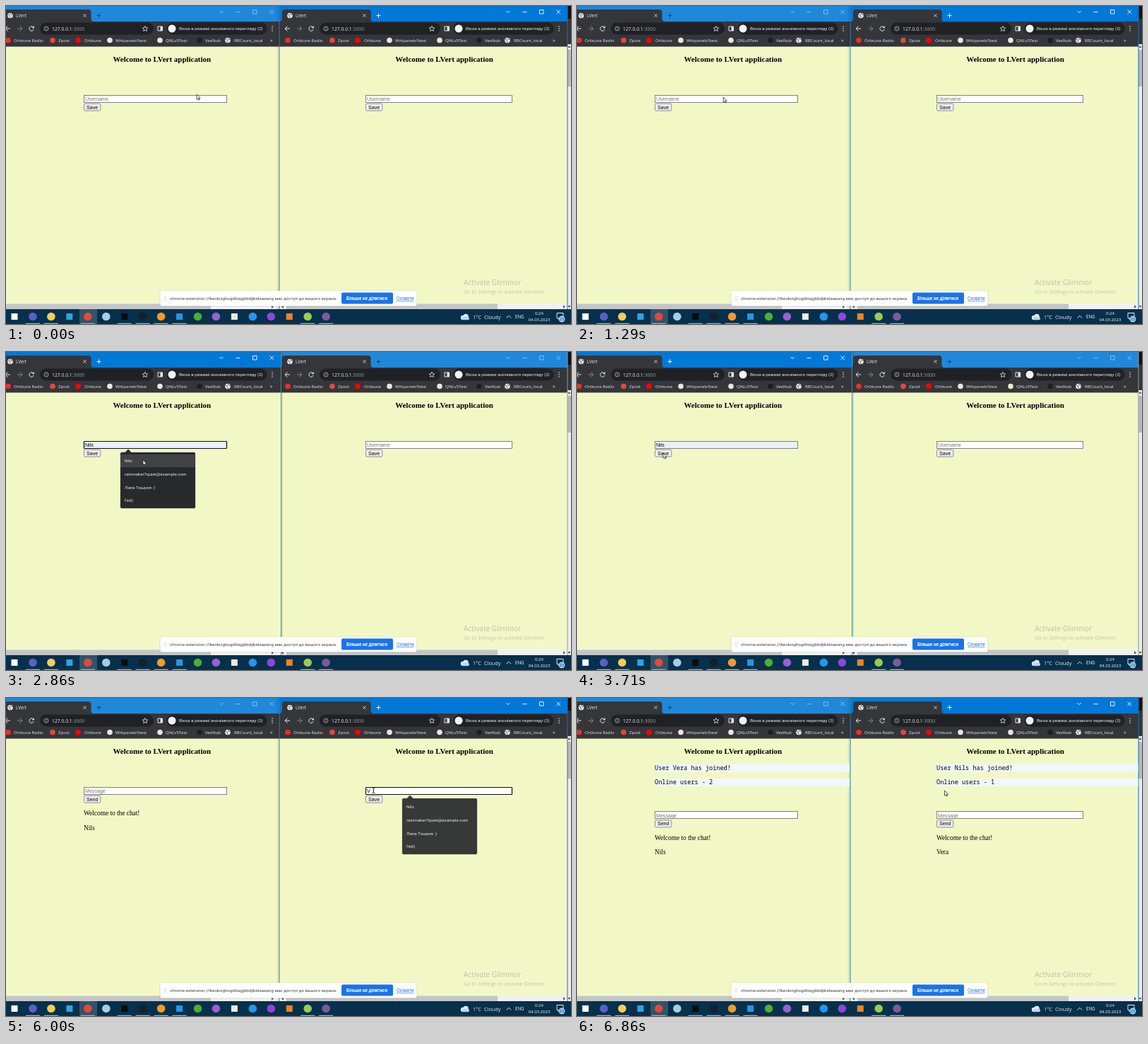
Animation of 800x450 px, one loop 8 s. Source, as an HTML page:

```html
<!DOCTYPE html>
<html lang="uk">
<head>
<meta charset="utf-8">
<title>Chat demo</title>
<style>
  html, body { margin: 0; width: 100%; height: 100%; overflow: hidden; background: #f1f8c6; }
  svg { display: block; width: 800px; height: 450px; font-family: "Open Sans", "Noto Sans", sans-serif; }
  .ui { font-family: Roboto, "Open Sans", sans-serif; }
  .form { font-family: "Liberation Sans", Arial, sans-serif; }
  .serif { font-family: "Liberation Serif", "Times New Roman", serif; }
  .mono { font-family: "Noto Sans Mono", "DejaVu Sans Mono", monospace; }
</style>
</head>
<body>
<svg id="stage" viewBox="0 0 800 450"></svg>
<script>
const LOOP = 8000, TICKS_PER_MS = 7 / 1000;
const APP = 'LVert', FIRST = 'Nils', SECOND = 'Vera';
const SUGGESTIONS = [FIRST, 'rainmaker7quiet@example.com', 'Лапа Тошуня :)', 'Гей)'];
const PAGE = '#f1f8c6', TOOLBAR = '#35363a', PALE = '#e8eaed';

const rect = (x, y, w, h, fill, extra = '') =>
  `<rect x="${x}" y="${y}" width="${w}" height="${h}" fill="${fill}" ${extra}/>`;
const disc = (x, y, r, fill) => `<circle cx="${x}" cy="${y}" r="${r}" fill="${fill}"/>`;
const line = (d, stroke = PALE, width = 1, extra = '') =>
  `<path d="${d}" fill="none" stroke="${stroke}" stroke-width="${width}" ${extra}/>`;
const text = (x, y, size, str, fill = PALE, extra = '') =>
  `<text x="${x}" y="${y}" font-size="${size}" fill="${fill}" ${extra}>${str}</text>`;
const shift = (dx, body, extra = '') => `<g transform="translate(${dx} 0)" ${extra}>${body}</g>`;
const MIDDLE = 'text-anchor="middle"';

const globe = (x, y) => disc(x, y, 3.8, '#eceef0') +
  line(`M${x - 3} ${y - 1.5}l2.5 1l-.5 2l2 1.5M${x + .5} ${y - 3.5}l.5 2l2.3 .5`, '#55585d', .9);

// Bookmarks: icon x, text x, label, icon colour (none means a globe)
const BOOKMARKS = [
  [3, 11, 'Orbtune Radio', '#e8302a'], [66, 74, 'Zpost', '#e04a3c'],
  [102, 111, 'Orbtune', '#f00'], [147, 155, 'Wrkpanelv5test', '#f2e3d8'],
  [218, 226, 'QNLv5Test', '#f2e3d8'], [274, 282, 'VexNub', '#1d1f22'],
  [314, 323, 'RBCount_local']
];

// dx moves parts anchored left, rx parts anchored right
function browser(x0, x1, dx, rx, active) {
  const white = active ? '#fff' : '#8fc3ec';
  const left =
    `<path d="M-9 22Q-5 22 -5 18V9Q-5 5 -1 5H116.5Q120.5 5 120.5 9V18Q120.5 22 124.5 22Z" fill="${TOOLBAR}"/>` +
    globe(6, 13.5) + text(14, 16, 6.3, APP) +
    line('M109.5 11.5l4 4m0 -4l-4 4', PALE, .9) +
    line('M128.5 13.5h6m-3 -3v6', active ? '#fff' : '#123f66', 1) +
    line('M6 32H-1M2.5 28.5L-1 32L2.5 35.5') +
    line('M16 32h7M19.5 28.5L23 32L19.5 35.5', '#85878a') +
    line('M38.6 30A3.2 3.2 0 1 0 39.2 33') + `<path d="M39.8 28v3.2h-3.2z" fill="${PALE}"/>` +
    rect(48, 23.5, 161 + rx - dx, 17, '#202124', 'rx="8.5"') +
    `<circle cx="57" cy="32" r="3" fill="none" stroke="#bdc1c6" stroke-width=".8"/>` +
    line('M57 31.5v2M57 30v.8', '#bdc1c6', .8) +
    text(65, 34.5, 6.8, '127.0.0.1<tspan fill="#9aa0a6">:3000</tspan>') +
    BOOKMARKS.map(([ix, tx, label, color]) =>
      (color ? disc(ix, 48.5, 3.8, color) : globe(ix, 48.5)) + text(tx, 51, 6.1, label)).join('');
  const controls = line('M302.5 7l2.5 2.5l2.5 -2.5M325.5 8.5h6M349.5 5.5h5.5v5.5h-5.5zM373.5 5.5l5.5 5.5m0 -5.5l-5.5 5.5', white, .9);
  const right = controls +
    line('M197 28.3l1.1 2.5l2.7 .2l-2.1 1.8l.7 2.7l-2.4 -1.4l-2.4 1.4l.7 -2.7l-2.1 -1.8l2.7 -.2z', PALE, .8) +
    line('M215 29h6.5v6h-6.5z', PALE, 1) + rect(218.5, 29, 3, 6, PALE) +
    rect(227.5, 23.5, 142, 17, '#202124', 'rx="8.5"') + disc(235, 32, 5.5, '#f1f3f4') +
    text(245, 34.2, 6.2, 'Вікна в режимі анонімного перегляду (2)', PALE, 'class="ui"') +
    [29, 32, 35].map(y => disc(377, y, .8, PALE)).join('');
  return rect(x0, 0, x1 - x0, 23, active ? '#0078d7' : '#2088da') +
    rect(x0, 22, x1 - x0, 36, TOOLBAR) + rect(x0, 57.5, x1 - x0, 364, PAGE) +
    shift(dx, left) + shift(rx, right) +
    text(rx ? 774 : 374, 51, 7, '»') + rect(x0, 421, x1 - x0, 9, '#f1f1f1');
}

function popup(dx, hover, opacity = 1) {
  return shift(dx,
    `<path d="M168 142.5L173 137.5L178 142.5Z" fill="#28292c"/>` +
    rect(161.5, 142, 107, 80, '#000', 'rx="2" opacity=".18"') +
    rect(162, 142, 106, 79, '#28292c', 'rx="2"') +
    (hover ? rect(162, 145, 106, 18, '#414246') : '') +
    SUGGESTIONS.map((s, i) => text(168, 156.2 + i * 18.7, 6.2, s, PALE, 'class="ui"')).join(''),
    `opacity="${opacity}"`);
}

function page({ x, w, middle, end, chat, name, value, auto, ring, news }) {
  const dy = news ? 34.7 : 0;
  const hint = chat ? 'Message' : 'Username';
  let out = text(middle, 79, 10.95, `Welcome to ${APP} application`, '#000', `class="serif" font-weight="bold" ${MIDDLE}`);
  if (news) out += news.map((s, i) =>
    rect(x, 93.5 + i * 20.5, end - x, 11, '#f0f7fd') +
    text(x, 101.7 + i * 20.5, 8.57, s, '#000', 'class="mono"')).join('');
  out += rect(x + .5, 126.5 + Math.floor(dy), w - 1, 10, auto ? '#e8f0fe' : '#fff',
      ring ? 'stroke="#101010" stroke-width="1.2" rx=".8"' : 'stroke="#767676" stroke-width=".9"') +
    text(x + 2, 134 + dy, 7.1, value || hint, value ? '#000' : '#757575', 'class="form"') +
    rect(x + .5, 138.2 + dy, 23.3, 10, '#efefef', 'rx="1.5" stroke="#767676" stroke-width=".8"') +
    text(x + 12.2, 145.5 + dy, 7.1, chat ? 'Send' : 'Save', '#000', `class="form" ${MIDDLE}`);
  if (chat) out += text(x, 166.3 + dy, 9.35, 'Welcome to the chat!', '#000', 'class="serif"') +
    text(x, 186.7 + dy, 9.35, name, '#000', 'class="serif"');
  return out;
}

const APPS = ['#fff', '#5a60c4', '#f6cc58', '#2ca5e0', '#e3493a', '#a9cbe4', '#0c0c0c', '#15202b', '#f29a2e',
  '#2497e3', '#4cae32', '#9a5fd0', '#f0eadc', '#2496ed', '#8f46d8', '#f58220', '#9ccc4c', '#7d5a9c'];
const RUNNING = [1, 2, 4, 6, 7, 8, 9, 16, 17];

function taskbar() {
  const at = i => 12 + i * 25.95;
  return rect(0, 429, 800, 21, '#06304b') + rect(104, 429, 25, 21, '#31536a') +
    APPS.map((c, i) => i % 3 ? disc(at(i).toFixed(1), 439.5, 5.8, c) : rect(at(i) - 4.5, 435, 9, 9, c)).join('') +
    RUNNING.map(i => rect(at(i) - 10, 448.8, 20, 1.2, '#76b9ed')).join('') +
    disc(647, 441, 3.2, '#dfe8f2') + disc(651, 439.5, 3.8, '#dfe8f2') +
    rect(646, 440, 10, 4.2, '#b9d4ee', 'rx="2"') +
    text(661, 443, 7.3, '1°C') + text(677, 443, 7.3, 'Cloudy') +
    line('M708.5 441.5l3.3 -3.3l3.3 3.3', '#fff', .9) + text(721, 442.4, 6.2, 'ENG', '#fff') +
    text(755, 437.4, 6, '0:24', '#fff', MIDDLE) + text(755, 446.4, 6, '04.03.2023', '#fff', MIDDLE) +
    line('M780 434.5h9v7h-5l-2 2v-2h-2z', '#fff', .9) + disc(787, 443, 4.5, '#8ed0f5') +
    text(787, 445.2, 5.5, '23', '#123', MIDDLE);
}

function overlays() {
  return text(648, 395.3, 10.1, 'Activate Glimmor', '#bcc0ae') +
    text(648, 407, 7.2, 'Go to Settings to activate Glimmor.', '#c0c4b0') +
    rect(217.5, 402.5, 365, 23, '#000', 'rx="2" opacity=".09"') + rect(218.5, 403, 363, 21.5, '#fff', 'rx="1.5"') +
    line('M224 410.5v7M226.5 410.5v7', '#b4b7bb', .9, 'stroke-dasharray="1 1"') +
    text(232, 416, 6.2, 'chrome-extension://lkeokcighogdliiajgbbdjibidaaeang має доступ до вашого екрана.', '#3c4043', 'class="ui"') +
    rect(475, 405.5, 73, 16, '#1a73e8', 'rx="2"') +
    text(511, 416, 6.3, 'Більше не ділитися', '#fff', `class="ui" font-weight="600" ${MIDDLE}`) +
    text(553, 416, 6.3, 'Сховати', '#1a73e8', 'class="ui" text-decoration="underline"');
}

function scrollbars() {
  return rect(0, 421.5, 290, 8, '#c3c6c8') + rect(397, 421.5, 299, 8, '#c3c6c8') +
    `<path d="M376 423l3 2.5l-3 2.5zM393 423l-3 2.5l3 2.5zM789 423l3 2.5l-3 2.5z" fill="#5a5a5a"/>`;
}

const backdrop = rect(795, 0, 5, 430, '#ececec') + rect(795, 0, 5, 18, '#111') + rect(795, 18, 5, 36, TOOLBAR) +
  '<path d="M795.5 59l2 -3l2 3z" fill="#555"/>' + rect(795, 62, 5, 52, '#b9b9b9') +
  '<path d="M795.5 424l2 3l2 -3z" fill="#555"/>';

// Pointer stops: tick, x, y
const PATH = [[0, 270, 125], [4, 222, 126], [5, 222, 126], [6, 215, 126], [11, 202, 131], [12, 202, 131],
  [13, 201, 135], [14, 201, 135], [15, 201, 144], [17, 198, 152], [18, 198, 152], [21, 192, 153],
  [26, 122, 143], [30, 122, 143], [37, 519, 133], [38, 520.5, 131], [56, 520.5, 131]];

function pointer(tick) {
  const i = PATH.findIndex(p => p[0] > tick);
  const [t0, x0, y0] = PATH[i - 1], [t1, x1, y1] = PATH[i];
  const f = (tick - t0) / (t1 - t0), x = x0 + (x1 - x0) * f, y = y0 + (y1 - y0) * f;
  const beam = tick >= 37 && tick < 48;
  return `<g transform="translate(${x} ${y})">` + (beam
    ? line('M-1.8 -3.5q1.8 0 1.8 1v5q0 1 -1.8 1M1.8 -3.5q-1.8 0 -1.8 1M0 2.5q0 1 1.8 1', '#111', .9)
    : '<path d="M0 0V7.2L1.7 5.7L2.8 8.2L4 7.7L2.9 5.3H5Z" fill="#fff" stroke="#111" stroke-width=".7"/>') + '</g>';
}

function scene(k) {
  const within = (from, to) => k >= from && k < to;
  const leftActive = within(10, 39), joined = k >= 48;
  const edge = leftActive ? 389 : 387;
  const news = (name, count) => joined && [`User ${name} has joined!`, `Online users - ${count}`];
  return backdrop +
    browser(387, 795, 396, 406, !leftActive) + browser(0, edge, 0, 0, leftActive) + scrollbars() +
    rect(794.5, 0, 1, 430, leftActive ? '#8a9aa2' : '#1473b5') +
    (leftActive
      ? rect(389, 0, 1, 430, '#4a8f9c') + rect(390, 0, 2, 430, '#000', 'opacity=".12"')
      : rect(386.5, 0, 1, 430, '#2f7fae') + rect(383.5, 0, 3, 430, '#000', 'opacity=".07"')) +
    page({ x: 110, w: 203, middle: 220.8, end: edge - 1, chat: k >= 28, name: FIRST,
      value: within(19, 28) && FIRST, auto: within(19, 28), ring: within(13, 26), news: news(SECOND, 2) }) +
    page({ x: 509, w: 208, middle: 620.5, end: 794.5, chat: joined, name: SECOND,
      value: within(42, 48) && SECOND.slice(0, k - 41), ring: within(39, 48), news: news(FIRST, 1) }) +
    (within(15, 22) ? popup(0, k >= 17) : '') + (within(40, 43) ? popup(399, false, k < 42 ? 1 : .92) : '') +
    (k === 38 ? rect(524.5, 138.5, 62, 13, '#fff', 'stroke="#767676" stroke-width=".8"') +
      text(528, 147.3, 6.1, 'Заповніть це поле.', '#575757', 'class="ui"') : '') +
    overlays() + taskbar() + pointer(k);
}

const stage = document.getElementById('stage');
let shown = -1;
function draw() {
  // the small offset absorbs rounding at tick edges
  const tick = Math.floor((performance.now() % LOOP) * TICKS_PER_MS + .05) % 56;
  if (tick !== shown) stage.innerHTML = scene(shown = tick);
  requestAnimationFrame(draw);
}
draw();
</script>
</body>
</html>
```
